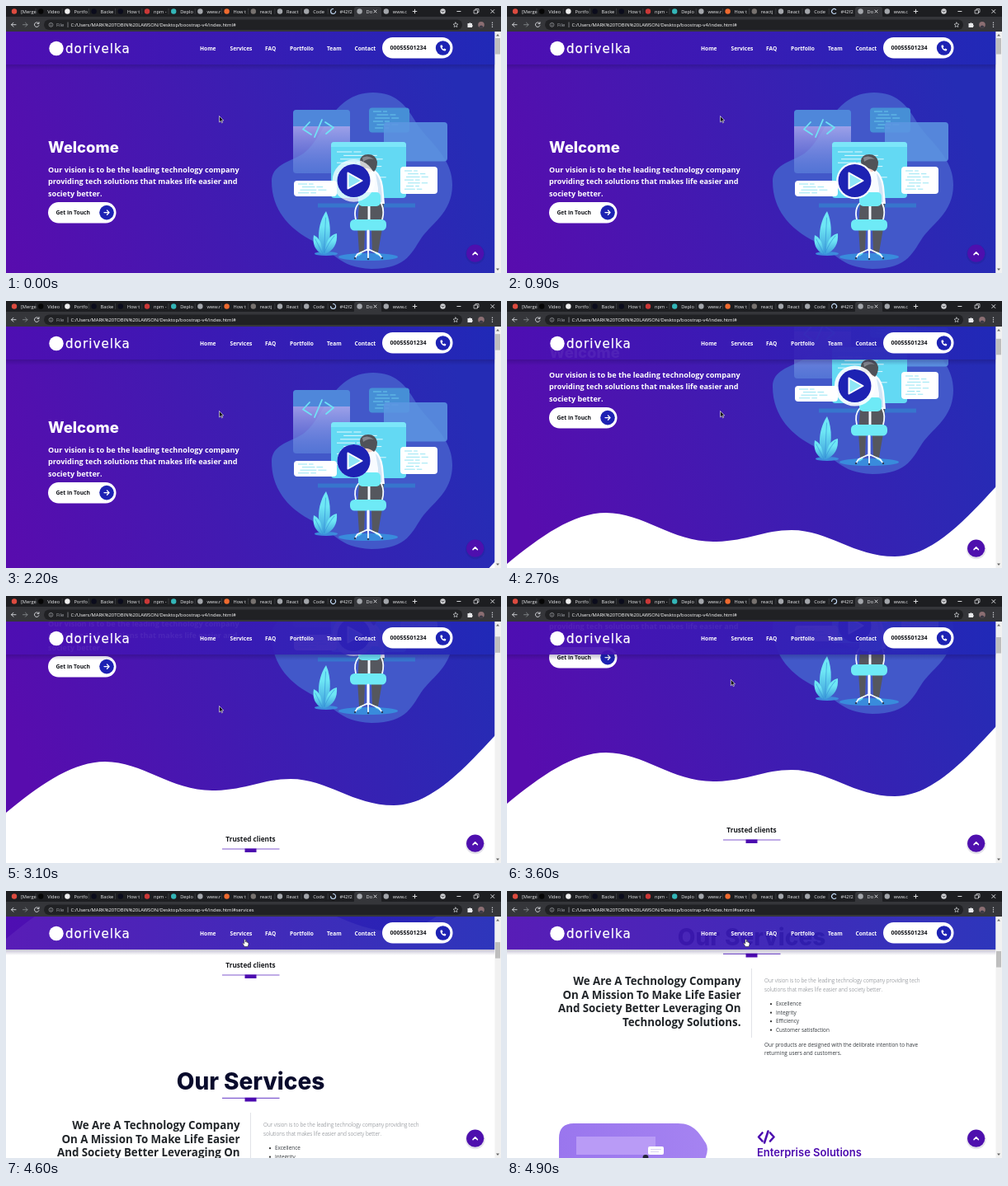
Write an HTML page that moves like this. It is 600 px wide and 324 px high and loops after 5 s.

```html
<!DOCTYPE html>
<html lang="en">
<head>
<meta charset="utf-8">
<title>Company landing page</title>
<style>
html, body { margin: 0; width: 100%; height: 100%; overflow: hidden; background: #fff; }
svg { display: block; width: 100vw; height: 100vh; }
text { font-family: "Open Sans", "Noto Sans", sans-serif; white-space: pre; }
.bold { font-weight: 700; }
.title { font-family: Inter, sans-serif; font-weight: 800; }
.tab { font-size: 5.7px; fill: #e6e7e9; }
.url { font-size: 5.85px; fill: #fff; }
.nav { font-size: 6.6px; font-weight: 700; fill: #fff; }
.lead { font-size: 9.1px; font-weight: 700; fill: #fff; }
.copy { font-size: 6.4px; fill: #33383d; }
.soft { fill: #6c7178; font-weight: 300; }
.line { fill: none; stroke-linecap: round; stroke-linejoin: round; }
</style>
</head>
<body>
<svg viewBox="0 0 600 324" preserveAspectRatio="none">
  <defs>
    <linearGradient id="hero" gradientUnits="userSpaceOnUse" x1="20" y1="370" x2="575" y2="190">
      <stop offset="0" stop-color="#580cae"/><stop offset="1" stop-color="#252cb5"/>
    </linearGradient>
    <linearGradient id="bar">
      <stop offset="0" stop-color="#4e0eb2"/><stop offset="1" stop-color="#2029b7"/>
    </linearGradient>
    <linearGradient id="shade" x2="0" y2="1">
      <stop offset="0" stop-color="#12064a" stop-opacity=".25"/><stop offset="1" stop-color="#12064a" stop-opacity="0"/>
    </linearGradient>
    <linearGradient id="glass" x2="0" y2="1">
      <stop offset="0" stop-color="#bfb4f2" stop-opacity=".7"/><stop offset="1" stop-color="#8a8ae6" stop-opacity=".1"/>
    </linearGradient>
    <linearGradient id="leaf" x2="0" y2="1">
      <stop offset=".35" stop-color="#6ee7f5"/><stop offset="1" stop-color="#3d9cdb"/>
    </linearGradient>
    <linearGradient id="lilac">
      <stop offset="0" stop-color="#9a76ee"/><stop offset="1" stop-color="#a583f1"/>
    </linearGradient>
    <clipPath id="view"><rect y="31" width="592.5" height="293"/></clipPath>
  </defs>

  <rect width="600" height="324" fill="#fff"/>
  <g clip-path="url(#view)"><g id="page">
    <path fill="url(#hero)" d="M0 0H593V334C555 375 515 419 470 419C420 419 390 387 345 387C310 387 290 401 250 401C200 401 165 366 120 366C80 366 40 395 0 428Z"/>

    <text class="title" x="51" y="178" font-size="18.5" fill="#fff">Welcome</text>
    <text class="lead" x="51" y="201.5">Our vision is to be the leading technology company</text>
    <text class="lead" x="51" y="216.2">providing tech solutions that makes life easier and</text>
    <text class="lead" x="51" y="230.9">society better.</text>
    <rect x="51" y="238" width="82.5" height="25.5" rx="12.75" fill="#fff"/>
    <text class="bold" x="60.5" y="253.2" font-size="6.7" fill="#111318">Get in Touch</text>
    <circle cx="122" cy="250.6" r="8.8" fill="#1d22b3"/>
    <path class="line" stroke="#fff" stroke-width="1.3" d="M119 250.6H125M122.5 248L125.1 250.6L122.5 253.2"/>

    <path fill="#4258c9" d="M445 105C471 105 484 119 495 138C507 161 541 181 541 217C541 248 520 261 506 278C492 297 488 319 443 319C402 317 398 298 374 286C346 273 322 249 322 213C322 193 342 190 359 180C385 164 393 105 445 105Z"/>
    <rect x="348" y="126" width="69" height="77" rx="4" fill="#5688dd" opacity=".55"/>
    <path d="M348 146H417V199Q417 203 413 203H352Q348 203 348 199Z" fill="url(#glass)"/>
    <path d="M348 146V130Q348 126 352 126H413Q417 126 417 130V146Z" fill="#4f87da"/>
    <path class="line" stroke="#6fe2f5" stroke-width="1.8" d="M368 141L360 149.5L370 156M383 138L374 159M387 141L397 147.5L388 155"/>
    <rect x="440" y="123.5" width="49" height="30" rx="4" fill="#468fd6"/>
    <g id="codeA"></g>
    <rect x="458" y="141" width="77" height="47.5" rx="4" fill="#5d97e2" opacity=".85"/>
    <rect x="394" y="165" width="91" height="68" rx="4" fill="#63d9f3"/>
    <path d="M394 171V169Q394 165 398 165H481Q485 165 485 169V171Z" fill="#7ce6f9"/>
    <g id="codeB"></g>
    <rect x="349" y="212" width="52" height="19" rx="4" fill="#fff"/>
    <g id="codeC"></g>
    <rect x="478" y="195" width="45" height="33" rx="4" fill="#fff"/>
    <g id="codeD"></g>
    <rect x="378" y="239.5" width="118" height="5" fill="#3775cd"/>

    <ellipse cx="388" cy="300.5" rx="14" ry="2.5" fill="#3d8bdc"/>
    <ellipse cx="439" cy="304.5" rx="36" ry="4.5" fill="#398bdc"/>
    <g fill="url(#leaf)">
      <path d="M384 301C375 284 379 262 388 249C395 264 394 287 387 301Z"/>
      <path d="M383 301C384 290 380 281 373 278C371 289 375 297 383 301Z"/>
      <path d="M387 301C386 287 392 278 401 276C402 288 397 297 387 301Z"/>
    </g>
    <path class="line" stroke="#338fd7" stroke-width=".6" d="M385.5 299L387.5 257M386 299Q391 287 398 279M383 299L375 283"/>
    <path fill="#f8fbff" d="M431 199Q439 194 447 199Q455 205 457 219L459 240H429V217Z"/>
    <path fill="#d2e5f5" d="M448 203Q456 211 456 238H451V221Z"/>
    <path fill="#f6cfc5" d="M434 192H445V200Q439 203 434 200Z"/>
    <path fill="#505258" d="M429 188Q430 180 439 180Q448 180 450 189Q450 197 446 201Q439 196 434 197Q429 195 429 188Z"/>
    <path fill="#85888e" d="M432 184Q439 180 446 186Q439 184 433 189Z"/>
    <path fill="#55575e" d="M428 240H458L456 270L451 299H444L443 272H435L434 299H428L426 268Z"/>
    <path class="line" stroke="#65ddf3" stroke-width="3" d="M430 300L427 302M449 300L453 302"/>
    <path class="line" stroke="#f5faff" stroke-width="3" d="M440 240V260"/>
    <rect x="427" y="226" width="27" height="17" rx="5" fill="#6eeaf6"/>
    <path class="line" stroke="#f5faff" stroke-width="1.8" d="M427 240Q421 247 424 259M455 240Q459 248 456 259"/>
    <rect x="417" y="259" width="44" height="13.5" rx="5.5" fill="#6eeaf6"/>
    <path class="line" stroke="#fff" stroke-width="3.2" d="M439 273V296"/>
    <path class="line" stroke="#f5faff" stroke-width="1.8" d="M423 306L426 301L439 295L452 301L456 306M439 295V307"/>
    <g fill="#2b3b60"><circle cx="423" cy="306" r="1.2"/><circle cx="439" cy="307" r="1.2"/><circle cx="456" cy="306" r="1.2"/></g>

    <circle id="ring" cx="421.5" cy="212" r="20" fill="#fff"/>
    <circle cx="421.5" cy="212" r="20" fill="#1d22b3"/>
    <path d="M414.5 202.5L431.5 212L414.5 221.5Z" fill="#8ee6f6" stroke="#fff" stroke-width="2" stroke-linejoin="round"/>

    <text class="bold" x="296.5" y="463" font-size="8.2" fill="#17191d" text-anchor="middle">Trusted clients</text>
    <path fill="#815bd0" d="M262 471.5H331.5V472.6H262Z"/>
    <path fill="#4c0baf" d="M289.5 471.5H303.5V476H289.5Z"/>

    <g transform="translate(0 545)">
      <text class="title" x="296.5" y="66" font-size="28" fill="#090b2c" text-anchor="middle">Our Services</text>
      <path fill="#815bd0" d="M262 75.8H331.5V77H262Z"/>
      <path fill="#4c0baf" d="M289.5 75.8H303.5V80.5H289.5Z"/>
      <g id="mission" class="bold" font-size="13.3" fill="#212529" text-anchor="end"></g>
      <path stroke="#dadce3" stroke-width=".8" d="M296.5 94V178"/>
      <text class="copy soft" x="312" y="111.2">Our vision is to be the leading technology company providing tech</text>
      <text class="copy soft" x="312" y="121.8">solutions that makes life easier and society better.</text>
      <g id="list"></g>
      <text class="copy" x="312" y="188.8">Our products are designed with the delibrate intention to have</text>
      <text class="copy" x="312" y="199.4">returning users and customers.</text>
      <path fill="url(#lilac)" d="M63 330V300Q63 282 81 282H207C228 282 234 296 241 306Q246 314 238 330Z"/>
      <rect x="84" y="298" width="96" height="22" fill="#b99bf6"/>
      <rect x="171" y="310" width="19" height="10" rx="2" fill="#fff"/>
      <path stroke="#cabdf0" stroke-width=".7" d="M174 313.5H187M174 316.5H184"/>
      <ellipse cx="168" cy="323" rx="3.4" ry="3" fill="#252538"/>
      <path class="line" stroke="#4c0baf" stroke-width="2.6" d="M309.5 293.5L305 298.5L309.5 303.5M316.5 291.5L312 305.5M319 293.5L323.5 298.5L319 303.5"/>
      <text x="303" y="321.5" style="font-family:Inter,sans-serif" font-weight="600" font-size="13" fill="#4c0baf">Enterprise Solutions</text>
    </g>
  </g></g>

  <rect y="71" width="592.5" height="7" fill="url(#shade)"/>
  <rect y="31" width="592.5" height="40" fill="url(#bar)" opacity=".94"/>
  <circle cx="61" cy="51.5" r="8.7" fill="#fff"/>
  <text x="72" y="57" font-size="15" letter-spacing="1.1" fill="#fff" stroke="#fff" stroke-width=".25" style="font-family:'DejaVu Sans',sans-serif">dorivelka</text>
  <g id="nav"></g>
  <rect x="456" y="38" width="85.5" height="25.5" rx="12.75" fill="#fff"/>
  <text class="bold" x="465.5" y="53.4" font-size="7" fill="#111318">00055501234</text>
  <circle cx="529.6" cy="51" r="8.8" fill="#1d22b3"/>
  <path fill="#fff" d="M526.5 47.7L528.5 47.2L529.5 49.6L528.4 50.6Q529 51.8 530.2 52.5L531.2 51.4L533.4 52.4L532.9 54.3Q530.5 55 528 52.6Q526 50.3 526.5 47.7Z"/>

  <circle cx="568.8" cy="301.5" r="11.8" fill="#1c0750" opacity=".12"/>
  <circle cx="568.7" cy="300.2" r="10.6" fill="#4e0fae"/>
  <path class="line" stroke="#fff" stroke-width="1.5" d="M566 301.6L568.7 298.9L571.4 301.6"/>

  <rect x="592.5" y="31" width="7.5" height="293" fill="#f1f1f1"/>
  <path fill="#666" d="M594 36.5L596 34L598 36.5ZM594 318.5L596 321L598 318.5Z"/>
  <rect id="thumb" x="593" y="39" width="6" height="19.5" fill="#bebebe"/>

  <rect width="600" height="14" fill="#1d1e21"/>
  <rect y="13" width="600" height="18" fill="#35363a"/>
  <path fill="#35363a" d="M420 14Q422 14 422 11V4Q422 1 425 1H452Q455 1 455 4V11Q455 14 457 14Z"/>
  <g id="tabs"></g>
  <path id="spinner" class="line" stroke="#c5dcf8" stroke-width="1.1" d="M396.6 3.5A3 3 0 1 0 399.6 6.5"/>
  <path class="line" stroke="#e8e9eb" stroke-width=".9" d="M446 5L449 8M449 5L446 8M493.2 6.5H497.8M495.5 4.2V8.8M546.8 6.5H551M587.8 4.5L591.8 8.5M591.8 4.5L587.8 8.5"/>
  <circle cx="529.5" cy="6.5" r="3.2" fill="#cfd0d3"/>
  <path class="line" stroke="#1d1e21" stroke-width=".9" d="M528.2 6L529.5 7.3L530.8 6"/>
  <path class="line" stroke="#e8e9eb" stroke-width=".7" d="M567.5 5H571.5V9H567.5ZM569 5V3.5H573V7.5H571.5"/>
  <rect x="46" y="16.5" width="507" height="12.5" rx="6.25" fill="#202124"/>
  <path class="line" stroke="#dadce0" stroke-width=".9" d="M12 22.7H6.5M9 20.2L6.5 22.7L9 25.2"/>
  <path class="line" stroke="#85888c" stroke-width=".9" d="M20.5 22.7H26M23.5 20.2L26 22.7L23.5 25.2"/>
  <path class="line" stroke="#dadce0" stroke-width=".9" d="M39.5 20.9A2.8 2.8 0 1 0 39.9 23.7M40 19.7V21.6H38"/>
  <circle cx="54.5" cy="22.8" r="2.4" fill="none" stroke="#b5b8bc" stroke-width=".6"/>
  <path stroke="#b5b8bc" stroke-width=".6" d="M54.5 22.5V24.2M54.5 21.2V21.8M75 19.5V26"/>
  <text class="url" x="61" y="25" style="fill:#a7abb0">File</text>
  <text class="url" id="url" x="78.5" y="25"></text>
  <path class="line" stroke="#d6d8dc" stroke-width=".7" d="M545 20L545.9 21.8L547.9 22.1L546.4 23.5L546.8 25.5L545 24.5L543.2 25.5L543.6 23.5L542.1 22.1L544.1 21.8Z"/>
  <path fill="#e8e9eb" d="M559.5 21H561.3A1.2 1.2 0 0 1 563.5 21H565V22.8A1.2 1.2 0 0 1 565 25V26H559.5Z"/>
  <circle cx="576" cy="22.8" r="3.8" fill="#8b6e72"/>
  <path fill="#393845" d="M573.3 25.5Q576 21.5 578.7 25.5Q576 27.8 573.3 25.5Z"/>
  <g fill="#dadce0"><circle cx="589.5" cy="20.3" r=".7"/><circle cx="589.5" cy="22.8" r=".7"/><circle cx="589.5" cy="25.3" r=".7"/></g>

  <path id="arrow" d="M0 0V7.5L1.8 5.9L3 8.4L4.1 7.9L3 5.5H5.2Z" fill="#111" stroke="#fff" stroke-width=".6"/>
  <path id="hand" d="M-.8 .7Q0-.6 .8 .7V3.4Q2-.1 2.3 3.8Q3.5 3 3.6 4.4Q4.8 3.8 4.5 6L3.6 9H-.4L-2.8 5.3Q-2.8 3.8-.8 5.5Z" fill="#fff" stroke="#222" stroke-width=".55"/>
</svg>
<script>
const $ = id => document.getElementById(id);
const label = (x, y, s, cls = '') => `<text x="${x}" y="${y}" class="${cls}">${s}</text>`;

const globe = '#a3a6ab';
$('tabs').innerHTML = [
  ['[Merge', '#dc4b3f'], ['Video', '#060606'], ['Portfo', '#f0f0f0'], ['Backe', '#0b0c1c'],
  ['How t', '#0b0c1c'], ['npm -', '#cb3837'], ['Deplo', '#33b6b8'], ['www.r', globe],
  ['How t', '#ef6a2f'], ['reactj', '#77726f'], ['React', globe], ['Code', globe],
  ['#42f2', ''], ['Do', globe], ['www.c', globe]
].map(([name, color], i) => {
  const x = 18 + i * 32.2;
  return (color ? `<circle cx="${x - 8}" cy="6.5" r="3.2" fill="${color}"/>` : '') +
    label(x, 8.6, name, 'tab') +
    (i < 12 ? `<path stroke="#4b4d51" stroke-width=".6" d="M${x + 18} 3V10"/>` : '');
}).join('');

$('nav').innerHTML = [['Home', 235], ['Services', 271.5], ['FAQ', 314], ['Portfolio', 344], ['Team', 389], ['Contact', 422.5]]
  .map(([s, x]) => label(x, 53.5, s, 'nav')).join('');

$('mission').innerHTML = ['We Are A Technology Company', 'On A Mission To Make Life Easier',
  'And Society Better Leveraging On', 'Technology Solutions.']
  .map((s, i) => label(283.5, 114 + i * 16.6, s)).join('');

$('list').innerHTML = ['Excellence', 'Integrity', 'Efficiency', 'Customer satisfaction']
  .map((s, i) => `<circle cx="320" cy="${137.2 + i * 10.5}" r="1.1" fill="#333"/>` +
    label(326, 139.4 + i * 10.5, s, 'copy')).join('');

// Rows of short strokes that read as lines of code.
function code(id, x, y, w, rows, gap, color) {
  let d = '';
  for (let i = 0; i < rows; i++) {
    const left = x + (i * 5 % 3) * w * .06;
    const len = w * (.45 + (i * 7 % 5) * .09);
    d += `M${left} ${y + i * gap}h${len * .6}m2 0h${len * .3}`;
  }
  $(id).innerHTML = `<path d="${d}" fill="none" stroke="${color}" stroke-width=".9"/>`;
}
code('codeA', 445, 128, 37, 6, 4, '#6bcdec');
code('codeB', 401, 177, 68, 10, 4.4, '#eefcff');
code('codeC', 354, 216, 41, 4, 3.6, '#8be2f2');
code('codeD', 483, 200, 34, 7, 3.7, '#8be2f2');

const scroll = [[0, 0], [2000, 0], [2100, 5], [2200, 18], [2700, 109], [3100, 165], [3200, 173], [3300, 176],
  [4300, 176], [4400, 200], [4500, 272], [4600, 370], [4700, 460], [4800, 521], [4900, 545]];
const mouseX = [[0, 258.5], [3300, 258.5], [3500, 265], [3800, 284], [4000, 289.5]];
const mouseY = [[0, 133.5], [3300, 133.5], [3500, 117], [3800, 70], [4000, 58.5]];

function at(table, t) {
  const i = table.findIndex(p => p[0] > t);
  if (i < 0) return table[table.length - 1][1];
  const [t0, a] = table[i - 1], [t1, b] = table[i];
  return a + (b - a) * (t - t0) / (t1 - t0);
}

const base = 'C:/Users/MARK%20TOBIN%20LAWSON/Desktop/boostrap-v4/index.html#';
const start = performance.now();

function draw() {
  // The picture advances in 100 ms steps; the small lead absorbs clock jitter.
  const t = Math.floor((performance.now() - start + 20) % 5000 / 100) * 100;
  const y = at(scroll, t);
  $('page').setAttribute('transform', `translate(0 ${-y})`);
  $('thumb').setAttribute('y', 39 + y * .0625);

  const p = (t + 800) % 1500 / 1500;
  $('ring').setAttribute('r', 20 + 6.5 * (1 - (1 - p) ** 3));
  $('ring').setAttribute('opacity', 1 - p * p);
  $('spinner').setAttribute('transform', `rotate(${t * .45} 396.6 6.5)`);

  const pos = `translate(${at(mouseX, t)} ${at(mouseY, t)})`;
  const onLink = t >= 3900;
  $('arrow').setAttribute('transform', pos);
  $('hand').setAttribute('transform', pos);
  $('arrow').style.display = onLink ? 'none' : '';
  $('hand').style.display = onLink ? '' : 'none';
  $('url').textContent = base + (t >= 4300 ? 'services' : '');
  requestAnimationFrame(draw);
}
draw();
</script>
</body>
</html>
```
